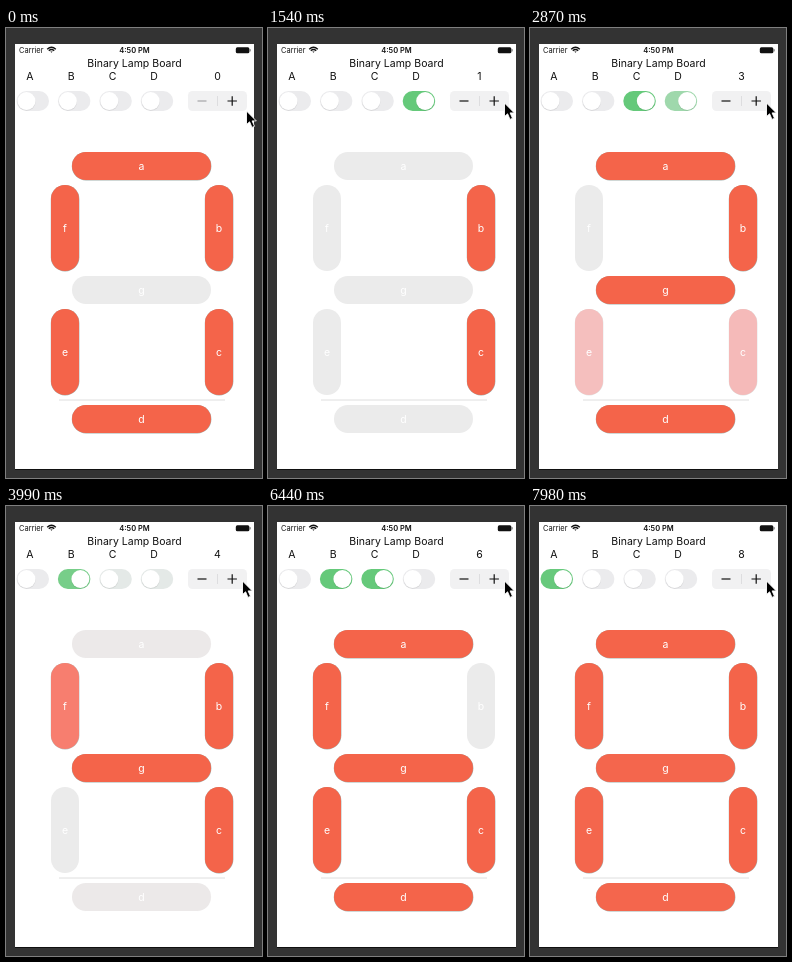
An HTML page for the animation above (8 s loop, 256x450 px).

```html
<!DOCTYPE html>
<html lang="en">
<head>
<meta charset="utf-8">
<title>Binary Lamp Board</title>
<style>
  html, body { margin: 0; width: 100%; height: 100%; overflow: hidden; background: #333; }
  svg { display: block; width: 100vw; height: 100vh; }
  text { font-family: Inter, "Liberation Sans", sans-serif; font-size: 10.5px; text-anchor: middle; fill: #111; }
  .status { font-size: 7.5px; }
  .seg text { fill: #fff; }
</style>
</head>
<body>
<svg id="stage" viewBox="0 0 256 450">
  <rect width="256" height="450" fill="#333"/>
  <rect x="9" y="16" width="239" height="426" fill="#111"/>
  <rect x="9" y="16" width="239" height="425" fill="#fff"/>
  <text class="status" x="13" y="25" style="text-anchor:start">Carrier</text>
  <g fill="none" stroke="#111" stroke-width="1.4">
    <path d="M41.2 21.2Q45.5 17.2 49.8 21.2M42.8 22.8Q45.5 20.4 48.2 22.8"/>
    <path d="M44.3 23.4h2.4l-1.2 1.3z" fill="#111" stroke="none"/>
  </g>
  <text class="status" x="128.5" y="25" font-weight="600">4:50 PM</text>
  <rect x="229.8" y="19.3" width="13.6" height="6" rx="1.6" fill="#111"/>
  <path d="M244.2 21.2v2.2" stroke="#555" stroke-width=".8"/>
  <text x="128.5" y="39">Binary Lamp Board</text>
  <text id="count" x="211.5" y="52">0</text>
  <g id="switches"></g>
  <rect x="182" y="63" width="59" height="20" rx="4.5" fill="#f1f1f2"/>
  <path d="M211.5 68v10" stroke="#d8d8da" stroke-width=".8"/>
  <path id="minus" d="M191.5 73h9" stroke="#111" stroke-width="1.2"/>
  <path d="M221.5 73h9.4M226.2 68.3v9.4" stroke="#111" stroke-width="1.2"/>
  <path d="M53 372h166" stroke="#dedede"/>
  <g id="segments"></g>
  <path id="cursor" d="M0 0V13.6L3.1 10.8L5.5 16.4L8 15.3L5.6 9.9H9.8Z"
    fill="#000" stroke="#fff" stroke-width=".9" stroke-linejoin="round"/>
</svg>
<script>
const NS = 'http://www.w3.org/2000/svg';
const $ = id => document.getElementById(id);
const LOOP = 8000, STEP = 70, FADE = 370;
const starts = [740, 1580, 2720, 3725, 4740, 5740, 6760, 7635];
const digits = ['abcdef', 'bc', 'abdeg', 'abcdg', 'bcfg', 'acdfg', 'acdefg', 'abc', 'abcdefg'];
const OFF = [235, 235, 235], ON = [244, 100, 74];
const TRACK_OFF = [235, 235, 237], TRACK_ON = [101, 201, 122];

function add(parent, tag, attrs, text) {
  const el = document.createElementNS(NS, tag);
  for (const k in attrs) el.setAttribute(k, attrs[k]);
  if (text) el.textContent = text;
  return parent.appendChild(el);
}

const clamp = x => Math.max(0, Math.min(1, x));
const smooth = x => x * x * (3 - 2 * x);
const mix = (a, b, p) => a + (b - a) * p;
const rgb = c => `rgb(${c.map(Math.round)})`;
const blend = (a, b, p) => rgb(a.map((v, i) => mix(v, b[i], p)));

// Mid-fade the lamps turn slightly pink.
const lampColor = p => rgb(OFF.map((v, i) =>
  Math.min(255, mix(v, ON[i], p) + [30, 0, 35][i] * p * (1 - p))));

const switches = [...'ABCD'].map((name, i) => {
  const x = 10.5 + i * 41.4, box = $('switches');
  add(box, 'text', { x: x + 13.3, y: 52 }, name);
  const track = add(box, 'rect', { x, y: 63, width: 32.5, height: 20, rx: 10 });
  add(box, 'circle', { cx: x + 10, cy: 73.7, r: 9.2, fill: '#000', opacity: .08 });
  const shade = box.lastChild;
  const knob = add(box, 'circle', { cx: x + 10, cy: 73, r: 9, fill: '#fff' });
  return { x, track, shade, knob, bit: 8 >> i };
});

const places = {
  a: [66, 124], g: [66, 248], d: [66, 377],
  f: [45, 157], b: [199, 157], e: [45, 281], c: [199, 281]
};
const segments = Object.entries(places).map(([name, [x, y]]) => {
  const flat = x === 66, w = flat ? 139 : 28, h = flat ? 28 : 86;
  const g = add($('segments'), 'g', { class: 'seg' });
  const rim = add(g, 'rect', { x: x - .2, y: y - .1, width: w + .6, height: h + .6, rx: 14.2, fill: '#8b9b98' });
  const lamp = add(g, 'rect', { x, y, width: w, height: h, rx: 14 });
  add(g, 'text', { x: x + w / 2, y: y + h / 2 + 3.7 }, name);
  return { name, rim, lamp };
});

// Level of a part going from one state to the next, with separate curves for each direction.
function level(was, is, rise, fall) {
  if (was === is) return is ? 1 : 0;
  return is ? rise : fall;
}

function draw(time) {
  const t = Math.floor(time % LOOP / STEP) * STEP;
  const n = starts.filter(s => t > s).length;
  const prev = Math.max(0, n - 1);
  const x = n ? clamp((t - starts[n - 1]) / FADE) : 1;

  const fade = smooth(x), gone = (1 - fade) ** 2.5;
  for (const s of segments) {
    const p = level(digits[prev].includes(s.name), digits[n].includes(s.name), fade, gone);
    s.lamp.setAttribute('fill', lampColor(p));
    s.rim.setAttribute('opacity', p * .8);
  }

  const tint = 1 - (1 - x) ** 1.6, slide = smooth(clamp(x / .4));
  for (const s of switches) {
    const was = !!(prev & s.bit), is = !!(n & s.bit);
    const p = level(was, is, tint, (1 - tint) ** 1.5);
    const cx = s.x + 10 + 12.5 * level(was, is, slide, 1 - slide);
    s.track.setAttribute('fill', blend(TRACK_OFF, TRACK_ON, p));
    s.knob.setAttribute('cx', cx);
    s.shade.setAttribute('cx', cx);
  }

  $('count').textContent = n;
  $('minus').setAttribute('stroke', n ? '#111' : '#a5a5a8');

  const m = t < 420 ? .88 * smooth(clamp(t / 280)) : 1;
  $('cursor').setAttribute('transform', `translate(${mix(240.5, 236.5, m)} ${mix(83, 75, m)})`);
}

const begin = performance.now();
function tick() {
  draw(performance.now() - begin);
  requestAnimationFrame(tick);
}
tick();
</script>
</body>
</html>
```
